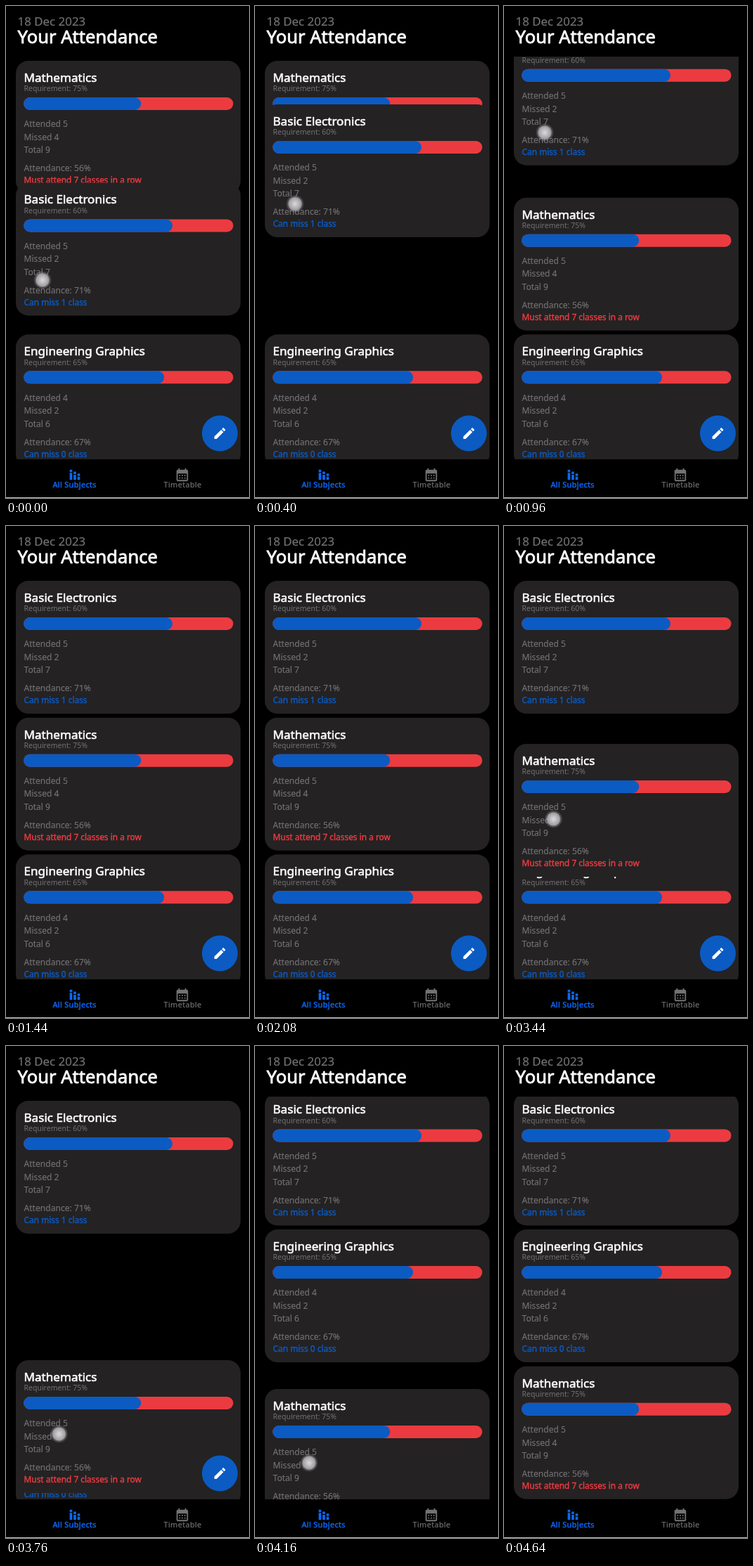
An HTML page with a canvas that plays this animation: 346x700 px, repeating every 4.72 s.

```html
<!DOCTYPE html>
<html lang="en">
<head>
<meta charset="utf-8">
<title>Your Attendance</title>
<style>
  html, body { margin: 0; width: 100%; height: 100%; overflow: hidden; background: #000; }
  canvas { display: block; }
</style>
</head>
<body>
<canvas id="stage" width="346" height="700"></canvas>
<script>
const ctx = document.getElementById('stage').getContext('2d');
const LOOP = 4720, STEP = 80;
const FONT = '"Noto Sans", "Open Sans", sans-serif';
const BLUE = '#0b5bc3', RED = '#eb3b40', GRAY = '#727173', CARD = '#242223', ACTIVE = '#0b68f5';
const TOP = 78, PITCH = 194.65, SCROLL = 11.6;
const LIST = { top: 72, bottom: 645 };

const math = { name: 'Mathematics', need: 75, attended: 5, missed: 4, note: 'Must attend 7 classes in a row', color: RED };
const electronics = { name: 'Basic Electronics', need: 60, attended: 5, missed: 2, note: 'Can miss 1 class', color: BLUE };
const graphics = { name: 'Engineering Graphics', need: 65, attended: 4, missed: 2, note: 'Can miss 0 class', color: BLUE };

const pencil = new Path2D('M3 17.25V21h3.75L17.81 9.94l-3.75-3.75L3 17.25zM20.71 7.04c.39-.39.39-1.02 0-1.41l-2.34-2.34c-.39-.39-1.02-.39-1.41 0l-1.83 1.83 3.75 3.75 1.83-1.83z');
const bars = new Path2D('M4 9h4v11H4zM4 4h4v4H4zM10 7h4v4h-4zM16 10h4v4h-4zM16 15h4v5h-4zM10 12h4v8h-4z');
const calendar = new Path2D('M19 4h-1V2h-2v2H8V2H6v2H5a2 2 0 0 0-2 2v14a2 2 0 0 0 2 2h14a2 2 0 0 0 2-2V6a2 2 0 0 0-2-2zM5 10h14v10H5zM7 12h2v2H7zM11 12h2v2h-2zM15 12h2v2h-2zM7 16h2v2H7zM11 16h2v2h-2zM15 16h2v2h-2z');

const clamp = v => Math.min(1, Math.max(0, v));
const smooth = p => p * p * (3 - 2 * p);
const easeOut = p => 1 - (1 - p) ** 3;
const slot = i => TOP + i * PITCH;
const ramp = (t, start, length, ease = smooth) => ease(clamp((t - start) / length));
const mix = (a, b, p) => a + (b - a) * p;

// Piecewise linear path through [time, value] points.
function follow(t, points) {
  let [t0, v0] = points[0];
  for (const [t1, v1] of points) {
    if (t < t1) return mix(v0, v1, clamp((t - t0) / (t1 - t0)));
    [t0, v0] = [t1, v1];
  }
  return v0;
}

// A thin outline of the given width gives a medium weight.
function text(str, x, y, size, color, outline = 0, spacing = 0) {
  ctx.font = `${size}px ${FONT}`;
  ctx.letterSpacing = spacing + 'px';
  ctx.fillStyle = ctx.strokeStyle = color;
  ctx.fillText(str, x, y);
  if (!outline) return;
  ctx.lineWidth = outline;
  ctx.lineJoin = 'round';
  ctx.strokeText(str, x, y);
}

function box(x, y, w, h, r, color) {
  ctx.fillStyle = color;
  ctx.beginPath();
  ctx.roundRect(x, y, w, h, r);
  ctx.fill();
}

function disc(x, y, r, color) {
  ctx.fillStyle = color;
  ctx.beginPath();
  ctx.arc(x, y, r, 0, 2 * Math.PI);
  ctx.fill();
}

// Icons are drawn on a 24 unit grid around their centre.
function icon(path, x, y, size, color) {
  ctx.save();
  ctx.translate(x, y);
  ctx.scale(size / 24, size / 24);
  ctx.translate(-12, -12);
  ctx.fillStyle = color;
  ctx.fill(path, 'evenodd');
  ctx.restore();
}

function drawCard(s, y) {
  const total = s.attended + s.missed;
  const percent = Math.round(s.attended / total * 100);
  box(14, y, 320, 189, 18, CARD);
  text(s.name, 25.5, y + 30, 17.1, '#fff', 0.6);
  text(`Requirement: ${s.need}%`, 25.5, y + 43.2, 10.5, GRAY);
  box(25.2, y + 52, 298.4, 18, 9, RED);
  box(25.2, y + 52, 2.984 * percent, 18, 9, BLUE);
  text(`Attended ${s.attended}`, 25.5, y + 94.2, 12.1, GRAY, 0.15);
  text(`Missed ${s.missed}`, 25.5, y + 112.8, 12.1, GRAY, 0.15);
  text(`Total ${total}`, 25.5, y + 131.4, 12.1, GRAY, 0.15);
  text(`Attendance: ${percent}%`, 25.5, y + 157.4, 12.1, GRAY, 0.15);
  text(s.note, 25.5, y + 174.2, 11.9, s.color, 0.4);
}

function drawButton(scale) {
  if (scale <= 0) return;
  disc(304.5, 608, 25.5 * scale, BLUE);
  icon(pencil, 304.5, 608, 21 * scale, '#fff');
}

function drawHeader() {
  text('18 Dec 2023', 16.5, 28, 16.9, GRAY, 0.2);
  text('Your Attendance', 16.5, 53, 25.6, '#fff', 0.8);
}

function drawNav() {
  icon(bars, 98, 667, 22, ACTIVE);
  text('All Subjects', 66.5, 685.3, 11, ACTIVE, 0.45, 0.3);
  icon(calendar, 251, 667, 22, GRAY);
  text('Timetable', 224.5, 685.3, 11, GRAY, 0.15, 0.3);
  box(0, 699, 346, 1, 0, '#c4c4c4');
}

function drawTouch(x, y) {
  const glow = ctx.createRadialGradient(x, y, 8, x, y, 13);
  glow.addColorStop(0, 'rgba(200,195,205,.6)');
  glow.addColorStop(1, 'rgba(200,195,205,0)');
  disc(x, y, 13, glow);
  const body = ctx.createRadialGradient(x, y, 1, x, y, 9.5);
  body.addColorStop(0, '#d6d3d6');
  body.addColorStop(0.6, '#b4b1b5');
  body.addColorStop(1, '#9a979c');
  disc(x, y, 9.5, body);
}

function electronicsY(t) {
  const drag = follow(t, [[0, 251.4], [400, 140], [690, 76], [960, 37.7], [1120, 34]]);
  return mix(drag, slot(0), ramp(t, 1120, 320, easeOut));
}

function mathY(t, scroll) {
  if (t < 3300) return mix(slot(0), slot(1), ramp(t, 680, 250));
  const drag = follow(t, [[3300, slot(1)], [3440, 310], [3600, 376], [3760, 447], [3920, 482], [4080, 488]]);
  return mix(drag, slot(2) - scroll, ramp(t, 4200, 300, easeOut));
}

function render(t) {
  const scroll = SCROLL * ramp(t, 3800, 240);
  const cards = [
    [graphics, mix(slot(2), slot(1), ramp(t, 3840, 250)) - scroll],
    [math, mathY(t, scroll)],
    [electronics, electronicsY(t) - scroll]
  ];

  ctx.fillStyle = '#000';
  ctx.fillRect(0, 0, 346, 700);
  ctx.save();
  ctx.beginPath();
  ctx.rect(0, LIST.top, 346, LIST.bottom - LIST.top);
  ctx.clip();
  for (const [subject, y] of cards) drawCard(subject, y);
  ctx.restore();

  drawHeader();
  drawButton(1 - ramp(t, 3840, 240));
  drawNav();

  if (t < 1120) {
    drawTouch(follow(t, [[0, 52], [400, 57], [960, 58]]),
              follow(t, [[0, 390], [400, 281.5], [690, 218], [960, 180], [1120, 176]]));
  } else if (t >= 3120 && t < 4200) {
    drawTouch(follow(t, [[3120, 65.5], [3760, 75.5], [4080, 77]]),
              follow(t, [[3120, 384.5], [3300, 386], [3440, 417], [3600, 482], [3760, 552], [3920, 587], [4080, 593]]));
  }
}

const start = performance.now();
function tick() {
  const t = (performance.now() - start) % LOOP;
  render(Math.floor(t / STEP) * STEP);
  requestAnimationFrame(tick);
}
tick();
</script>
</body>
</html>
```
